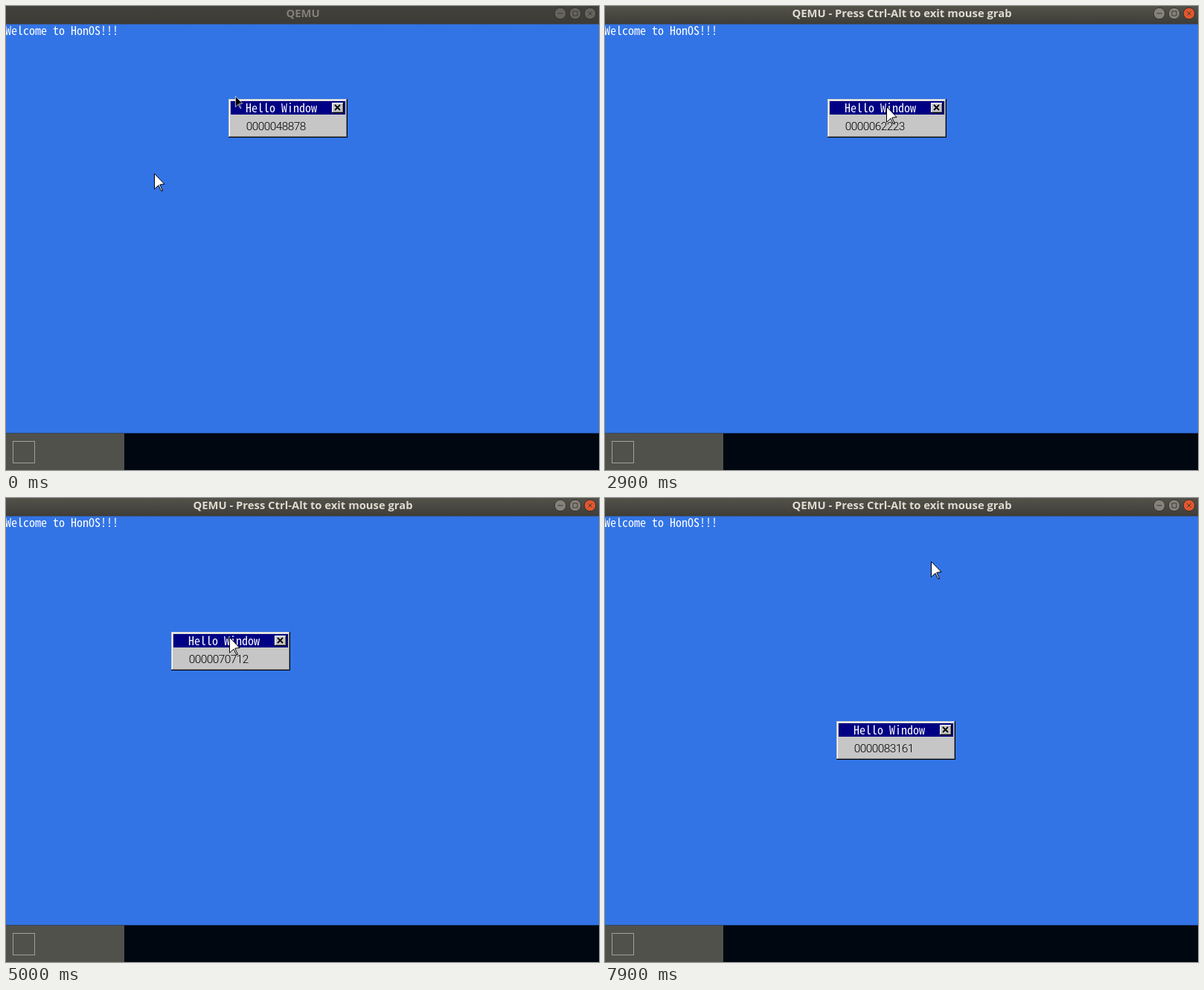
Recreate the animation shown at these times as an HTML page with a canvas. Size 797x624 px, loop 8000 ms.

```html
<!DOCTYPE html>
<html lang="en">
<head>
<meta charset="utf-8">
<title>QEMU desktop</title>
<style>
  html, body { margin: 0; width: 100%; height: 100%; overflow: hidden; background: #3274e6; }
  canvas { display: block; }
</style>
</head>
<body>
<canvas id="stage" width="797" height="624"></canvas>
<script>
const ctx = document.getElementById('stage').getContext('2d');
const LOOP = 8000, STEP = 100, GRAB = 600, BAR = 24.5;
const DRAG_START = 3000, DRAG_END = 6300;
const LETTERS = '300 16px "Noto Sans Mono CJK JP", "Noto Sans CJK JP", "Liberation Mono", monospace';
const DIGITS = '300 15.5px Roboto, "Liberation Sans", sans-serif';

// Turning points of each hand movement: time, x, y.
const approach = [[500, 199, 225], [900, 348, 466], [1500, 380, 150], [2900, 378, 135]];
const drag = [[3000, 299, 125], [3500, -20, 123], [4100, 720, 166], [4400, 720, 166],
  [4700, 500, 18], [5000, 222, 180], [5500, 256, 394], [5700, 226, 350], [6100, 311, 300]];
const leave = [[6600, 389, 307], [7500, 438, 85]];

const clamp = (v, lo, hi) => Math.min(hi, Math.max(lo, v));
const smooth = k => k * k * (3 - 2 * k);

function follow(path, t) {
  const next = clamp(path.findIndex(p => p[0] > t), 1, path.length - 1);
  const b = t >= path[path.length - 1][0] ? path[path.length - 1] : path[next];
  const a = path[path.indexOf(b) - 1];
  const k = smooth(clamp((t - a[0]) / (b[0] - a[0]), 0, 1));
  return [1, 2].map(i => Math.round(a[i] + (b[i] - a[i]) * k));
}

// Counting slows down while the window is being moved.
function counterAt(t) {
  return Math.floor(48878 + 4.602 * t - 0.56 * clamp(t - 2900, 0, 3700));
}

function cursorAt(t, [wx, wy]) {
  if (t < DRAG_START) return follow(approach, t);
  return t < DRAG_END ? [wx + 78, wy + 7] : follow(leave, t);
}

function rect(color, x, y, w, h) {
  ctx.fillStyle = color;
  ctx.fillRect(x, y, w, h);
}

// Fixed 8 px character cells.
function write(text, x, baseline, color, font) {
  ctx.font = font;
  ctx.fillStyle = color;
  ctx.textAlign = 'center';
  [...text].forEach((ch, i) => ctx.fillText(ch, x + i * 8 + 4, baseline));
}

const arrow = new Path2D('M.5 .5V21.2L6 16.2L9.5 23.5H11.5L7.8 15.2L14 14.5Z');
function drawArrow(x, y, scale, fill, stroke) {
  ctx.save();
  ctx.translate(x, y);
  ctx.scale(scale, scale);
  ctx.fillStyle = fill;
  ctx.strokeStyle = stroke;
  ctx.lineWidth = 1;
  ctx.fill(arrow);
  ctx.stroke(arrow);
  ctx.restore();
}

function drawCloseBox() {
  rect('#000', 0, 0, 16, 14);
  rect('#fff', 0, 0, 15, 13);
  rect('#848484', 1, 1, 14, 12);
  rect('#c6c6c6', 1, 1, 13, 11);
  ctx.strokeStyle = '#000';
  ctx.lineWidth = 1.8;
  ctx.stroke(new Path2D('M4 3L11 10M11 3L4 10'));
}

function drawWindow(x, y, count) {
  const w = 160, h = 52;
  ctx.save();
  ctx.translate(x, y);
  rect('#000', 0, 0, w, h);
  rect('#c6c6c6', 0, 0, w - 1, h - 1);
  rect('#848484', 1, 1, w - 2, h - 2);
  rect('#fff', 1, 1, w - 3, h - 3);
  rect('#c6c6c6', 2, 2, w - 4, h - 4);
  rect('#000084', 3, 3, w - 6, 18);
  write('Hello Window', 23, 18, '#fff', LETTERS);
  write(String(count).padStart(10, '0'), 24, 42, '#000', DIGITS);
  ctx.translate(w - 21, 5);
  drawCloseBox();
  ctx.restore();
}

function drawButton(x, fill, ink, icon) {
  ctx.save();
  ctx.translate(x, 10);
  ctx.beginPath();
  ctx.arc(0, 0, 7.7, 0, 7);
  ctx.fillStyle = fill;
  ctx.fill();
  ctx.lineWidth = 1;
  ctx.strokeStyle = '#33322e';
  ctx.stroke();
  ctx.strokeStyle = ink;
  ctx.stroke(new Path2D(icon));
  ctx.restore();
}

function drawTitleBar(active) {
  const shade = ctx.createLinearGradient(0, 0, 0, BAR);
  shade.addColorStop(0, active ? '#54534a' : '#42413b');
  shade.addColorStop(1, active ? '#3d3c37' : '#3c3b36');
  rect(shade, 0, 0, 797, BAR);
  ctx.font = 'bold 14.8px "Open Sans", "Noto Sans", sans-serif';
  ctx.textAlign = 'center';
  ctx.fillStyle = active ? '#dfdbd2' : '#827f78';
  ctx.fillText(active ? 'QEMU - Press Ctrl-Alt to exit mouse grab' : 'QEMU', 399, 15);
  const fill = active ? '#85827a' : '#66645d', ink = active ? '#3b3a35' : '#393833';
  drawButton(745, fill, ink, 'M-3.5 0H3.5');
  drawButton(765, fill, ink, 'M-3 -3H3V3H-3Z');
  drawButton(785, active ? '#e4572e' : fill, ink, 'M-2.7 -2.7L2.7 2.7M2.7 -2.7L-2.7 2.7');
}

function drawDesktop() {
  rect('#3274e6', 0, 0, 797, 624);
  write('Welcome to HonOS!!!', -1, 39, '#fff', LETTERS);
  rect('#000710', 0, 574.5, 797, 50);
  rect('#50514b', 0, 574.5, 159, 50);
  ctx.strokeStyle = '#a0a09c';
  ctx.lineWidth = 1;
  ctx.strokeRect(9.5, 585.5, 29, 29);
}

function draw(t) {
  const pos = follow(drag, t);
  drawDesktop();
  drawWindow(...pos, counterAt(t));
  drawArrow(...cursorAt(t, pos), 1, '#fff', '#000');
  drawTitleBar(t >= GRAB);
  if (t < GRAB) drawArrow(308, 121, 0.7, '#000', '#fff');
}

function tick() {
  const t = performance.now() % LOOP;
  draw(Math.floor(t / STEP) * STEP);
  requestAnimationFrame(tick);
}
tick();
</script>
</body>
</html>
```
